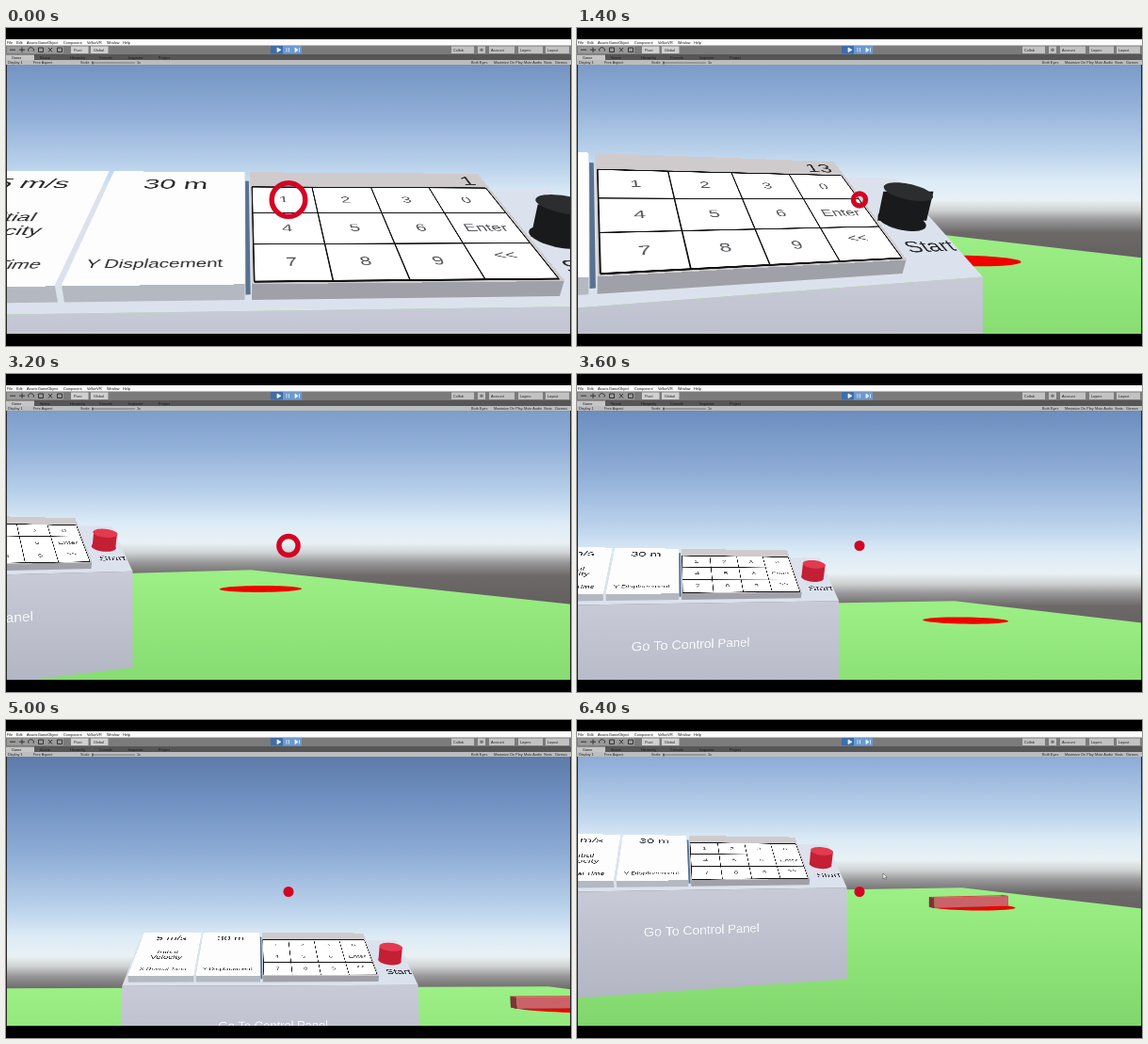
These frames come from a looping animation (600 by 338 pixels, 6.5 s). An HTML page with a canvas:

```html
<!DOCTYPE html>
<html lang="en">
<head>
<meta charset="utf-8">
<title>Control panel</title>
<style>
html, body { margin: 0; width: 100%; height: 100%; overflow: hidden; background: #000; }
#stage { position: relative; width: 600px; height: 338px; overflow: hidden; background: #000;
  font-family: "Liberation Sans", Arial, sans-serif; }
#view { position: absolute; left: 0; top: 39px; width: 600px; height: 286px; overflow: hidden; }
#view::after { content: ""; position: absolute; inset: 0; border: solid #2a2a2a; border-width: 0 1px; }
#world { position: absolute; left: 0; top: -39px; width: 600px; height: 338px; }
canvas, svg { position: absolute; left: 0; top: 0; }
.surface { position: absolute; left: 0; top: 0; width: 0; height: 0; transform-origin: 0 0; }
.surface div { position: absolute; }
.surface .label { white-space: pre; line-height: 1; transform: translate(-50%, -50%); }
svg text { font-size: 3.8px; }
</style>
</head>
<body>
<div id="stage">
  <div id="view"><div id="world">
    <canvas id="scene" width="600" height="338"></canvas>
    <div id="panel" class="surface"></div>
    <div id="desk" class="surface"></div>
    <div id="face" class="surface"></div>
    <svg width="600" height="338">
      <circle id="ring" cx="300" cy="182.500" fill="none" stroke="#d30424" stroke-width="5.500"/>
      <path id="mouse" d="M325 163v6l1.400-1.300 1 2.200 1-.5-1-2.100h1.800z" fill="#fff" stroke="#333" stroke-width=".5"/>
    </svg>
  </div></div>
  <svg id="chrome" width="600" height="39">
    <rect y="12" width="600" height="7" fill="#fbfbfb"/>
    <rect y="18.500" width="600" height="9.500" fill="#7b7b7b"/>
    <rect y="28" width="600" height="6" fill="#565656"/>
    <rect y="28.500" width="30" height="6" fill="#c6c6c6"/>
    <rect y="34" width="600" height="5" fill="#bdbdbd"/>
    <rect x="1" y="19.500" width="60" height="7.500" fill="#9a9a9a"/>
    <path d="M4 23.200h6M14 23.200h6M17 20.500v5.400M24 24.600a3 2.500 0 1 1 5 0M34.500 21h5v4.500h-5zM45 21l4 4.500m0-4.500l-4 4.500M54.500 21h5v4.500h-5z" fill="none" stroke="#333"/>
    <path d="M69 19.500h18.500v7.500H69zM90 19.500h18.500v7.500H90z" fill="#d0d0d0"/>
    <path d="M281 19h33v8.500h-33z" fill="#6c9ace"/>
    <path d="M281 19h13v8.500h-13z" fill="#3f6da8"/>
    <path d="M288 21l4 2.300-4 2.300zM298 21v4.500M300.500 21v4.500M307 21l3 2.300-3 2.300zM311.500 21v4.500" fill="#eaf3ff" stroke="#eaf3ff" stroke-width=".8"/>
    <path d="M473 19.500h24v7.500h-24zM501 19.500h8v7.500h-8zM513 19.500h27v7.500h-27zM544 19.500h26v7.500h-26zM573 19.500h25v7.500h-25z" fill="#c2c2c2"/>
    <circle cx="505" cy="23.200" r="1.800" fill="#777"/>
    <path d="M91 37h46" stroke="#555" stroke-width=".7"/>
    <path d="M92 35.500v3" stroke="#333"/>
  </svg>
</div>
<script>
const $ = id => document.getElementById(id);
const LOOP = 6500, FOCAL = 580, CX = 300, CY = 182.5;
const JUMP = 3000, FALL = 4100, LAND = 4900;
const NEAR = [0, 0, 0], FAR = [-.28, -.26, -12.35];

// Head direction: time, yaw and pitch in degrees
const gaze = [[0, 4.7, 1.85], [500, 16.9, 1.8], [900, 16.9, 1.8], [1400, 26.5, .35], [2000, 25.95, -.65],
  [2200, 25.95, -.65], [2600, 31.4, -.2], [3000, 31.4, -.2], [3200, 32.9, 0], [4100, 0, 7.65],
  [5000, 3.8, 7.05], [6400, 18.3, -3], [6500, 18.3, -3]];
const reticle = [[0, 17.8], [1200, 17.8], [1400, 6.5], [1500, 6.5], [1800, 17.5], [3000, 17.5],
  [3400, 2.8], [6500, 2.8]];

const rad = deg => deg * Math.PI / 180;
const mix = (a, b, k) => a + (b - a) * k;
const clamp = k => Math.max(0, Math.min(1, k));

function track(keys, t) {
  const i = keys.findIndex((key, n) => n && key[0] >= t);
  const a = keys[i - 1], b = keys[i];
  const k = (t - a[0]) / (b[0] - a[0]), ease = k * k * (3 - 2 * k);
  return a.slice(1).map((n, j) => mix(n, b[j + 1], ease));
}

// Camera
let eye = NEAR, yaw = 0, pitch = 0;

function turn([x, y, z]) {
  const ahead = x * Math.sin(yaw) + z * Math.cos(yaw);
  return [x * Math.cos(yaw) - z * Math.sin(yaw),
    y * Math.cos(pitch) - ahead * Math.sin(pitch),
    ahead * Math.cos(pitch) + y * Math.sin(pitch)];
}
const column = ([x, y, z]) => [CX * z + FOCAL * x, CY * z - FOCAL * y, 0, z];
const fromEye = p => turn(p.map((n, i) => n - eye[i]));
function spot(p) {
  const [x, y, , w] = column(fromEye(p));
  return [x / w, y / w];
}
// Lays an element on a plane; 100 CSS pixels make one unit.
function lay(id, origin, right, down) {
  const unit = v => column(turn(v.map(n => n / 100)));
  const m = [...unit(right), ...unit(down), 0, 0, 1, 0, ...column(fromEye(origin))];
  $(id).style.transform = `matrix3d(${m.map(n => n.toFixed(8))})`;
}

// The tilted panel: a goes right, b up the slope, n out of it. A key is 1 wide.
const ROW = .837, TILT = rad(31.5), S = Math.sin(TILT), C = Math.cos(TILT);
const DEEP = -.27, FLOOR = -4.57;
const on = (a, b, n = 0) => [.137 + a, -.809 + S * b + C * n, 6.9 + C * b - S * n];
const desk = { left: -4.82, right: 5.44, front: -.24, back: 2.95, tall: 3.4 };
const blocks = [[-4.65, -2.42], [-2.34, -.12], [-.03, 4.06]];
const TOP = -.65, BOTTOM = 3.06;

function plate(u0, v0, u1, v1, color) {
  const d = document.createElement('div');
  d.style.cssText = `left:${u0 * 100}px;top:${v0 * ROW * 100}px;width:${(u1 - u0) * 100}px;` +
    `height:${(v1 - v0) * ROW * 100}px;background:${color}`;
  $('panel').append(d);
}
function label(parent, text, x, y, size, color = '#2c2c2e') {
  const d = document.createElement('div');
  d.className = 'label';
  d.textContent = text;
  d.style.cssText = `left:${x * 100}px;top:${y * 100}px;font-size:${size}px;color:${color}`;
  $(parent).append(d);
  return d;
}
const write = (text, u, v, size, color) => label('panel', text, u, v * ROW, size, color);

plate(-.11, TOP + .4, -.05, 3.3, '#58728f');
blocks.forEach(([a, b], i) => plate(a, TOP, b, BOTTOM, i < 2 ? '#fdfdfe' : '#cfcbcd'));
plate(0, 0, 4, 3, '#fff');
for (let i = 0; i <= 4; i++) plate(i - .012, 0, i + .012, 3, '#111');
for (let i = 0; i <= 3; i++) plate(0, i - .02, 4, i + .02, '#111');
['1', '2', '3', '0', '4', '5', '6', 'Enter', '7', '8', '9', '<<'].forEach((key, i) =>
  write(key, i % 4 + .5, Math.floor(i / 4) + (key === '<<' ? .35 : .5), 28, '#55555a'));
write('5 m/s', -3.53, -.12, 47);
write('Initial', -3.53, 1.13, 33);
write('Velocity', -3.53, 1.57, 33);
write('X Reveal Time', -3.53, 2.52, 25);
write('30 m', -1.25, -.12, 47);
write('Y Displacement', -1.28, 2.52, 25);
const display = write('', 3.89, -.3, 44);
display.style.transform = 'translate(-100%, -50%)';
label('desk', 'Start', 4.94, -.62, 44);
label('face', 'Go To Control Panel', 5.16, 1.37, 42, '#f4f5f8');

// Editor bars
const bars = [
  [16.9, '#111', [1, 'File'], [11, 'Edit'], [22, 'Assets'], [34, 'GameObject'], [61, 'Component'], [86, 'VellunVR'], [107, 'Window'], [124, 'Help']],
  [24.8, '#222', [72, 'Pivot'], [93, 'Global'], [475, 'Collab'], [515, 'Account'], [546, 'Layers'], [575, 'Layout']],
  [32.6, '#161616', [6, 'Game'], [36, 'Scene'], [68, 'Hierarchy'], [99, 'Console'], [130, 'Inspector'], [162, 'Project']],
  [38.1, '#222', [2, 'Display 1'], [29, 'Free Aspect'], [79, 'Scale'], [139, '1x'], [494, 'Both Eyes'], [518, 'Maximize On Play'], [550, 'Mute Audio'], [571, 'Stats'], [583, 'Gizmos']]
];
for (const [y, fill, ...items] of bars) for (const [x, text] of items) {
  const el = document.createElementNS('http://www.w3.org/2000/svg', 'text');
  Object.entries({ x, y, fill }).forEach(pair => el.setAttribute(...pair));
  el.textContent = text;
  $('chrome').append(el);
}

const ctx = $('scene').getContext('2d');

function poly(fill, pts) {
  ctx.fillStyle = fill;
  ctx.beginPath();
  pts.forEach(p => ctx.lineTo(...p));
  ctx.fill();
}
const solid = (fill, ...pts) => poly(fill, pts.map(spot));
function disc(fill, [x, y, z], r, tilt = 0) {
  const pts = Array.from({ length: 48 }, (_, i) => {
    const a = i * Math.PI / 24, up = r * Math.sin(a);
    return [x + r * Math.cos(a), y + up * Math.sin(tilt), z + up * Math.cos(tilt)];
  });
  solid(fill, ...pts);
}
function fade(y0, y1, ...stops) {
  const g = ctx.createLinearGradient(0, y0, 0, y1);
  stops.forEach(([k, c]) => g.addColorStop(k, c));
  return g;
}

function drawLand() {
  const hz = CY + FOCAL * Math.tan(pitch) + 6;
  ctx.fillStyle = fade(hz - 240, hz + 60, [0, '#56739f'], [.2, '#6d8ebf'], [.42, '#90aed7'],
    [.6, '#bad2eb'], [.7, '#dcebf6'], [.77, '#e9f1f4'], [.805, '#cfd2d3'], [.84, '#98989a'], [.885, '#6d6969'], [1, '#625e5e']);
  ctx.fillRect(0, 0, 600, 338);

  const edge = [[-60, FLOOR, 72.6], [46.7, FLOOR, 72.6], [37.7, FLOOR, -.35]].map(spot);
  const y = edge[1][1];
  poly(fade(y, y + 150, [0, '#9cf085'], [1, '#80d56c']), [...edge, [9000, 400], [-9000, 400]]);
  disc('#f00000', [27.1, FLOOR, 35.1], 4.1);
}

function drawSlab(t) {
  const k = clamp((t - FALL) / (LAND - FALL));
  const x = mix(-12.7, 27.1, k), y = mix(9.9, FLOOR, k * k), z = 35.1;
  const [l, r, top, deep] = [x - 4.1, x + 4.1, y + 1, z + 1.2];

  const high = y - FLOOR, sx = -.38 * high, sz = z + .63 * high;
  solid('#4f8546', [l + sx, FLOOR, sz], [r + sx, FLOOR, sz], [r + sx, FLOOR, sz + 1.2], [l + sx, FLOOR, sz + 1.2]);

  solid('#7b3036', [l, y, z], [r, y, z], [r, y, deep], [l, y, deep]);
  solid('#e0353d', [l, top, z], [r, top, z], [r, top, deep], [l, top, deep]);
  for (const end of [l, r]) solid('#7e3338', [end, y, z], [end, top, z], [end, top, deep], [end, y, deep]);
  solid('#cb6268', [l, y, z], [r, y, z], [r, top, z], [l, top, z]);
}

function drawDesk() {
  const { left, right, front, back, tall } = desk;
  const a = on(left, front, DEEP), b = on(right, front, DEEP);
  const below = ([x, y, z]) => [x, y - tall, z];
  solid('#dce2ed', a, b, on(right, back, DEEP), on(left, back, DEEP));
  const y = spot(b)[1];
  poly(fade(y, y + 120, [0, '#c8cbd7'], [1, '#b2b5c2']), [a, b, below(b), below(a)].map(spot));
  const foot = (3 - BOTTOM) * ROW;
  blocks.forEach(([u0, u1], i) => solid(i < 2 ? '#b4b8c1' : '#a0a1a8',
    on(u0, foot + .02), on(u1, foot + .02), on(u1, foot, -.25), on(u0, foot, -.25)));
}

function drawKnob(red) {
  const tilt = rad(23), r = .43, high = .55;
  const base = on(4.8, 1.4, DEEP);
  const [x, y, z] = base;
  const cap = [x, y + high * Math.cos(tilt), z - high * Math.sin(tilt)];
  const side = ([px, py, pz], dx) => [px + dx * Math.cos(yaw), py, pz - dx * Math.sin(yaw)];
  const body = red ? '#c31f35' : '#191a1c';
  disc(body, base, r, tilt);
  solid(body, side(base, -r), side(base, r), side(cap, r), side(cap, -r));
  disc(red ? '#e33a50' : '#2b2d2f', cap, r, tilt);
}

function draw(t) {
  [yaw, pitch] = track(gaze, t).map(rad);
  eye = t < JUMP ? NEAR : FAR;
  drawLand();
  if (t >= JUMP) drawSlab(t);
  drawDesk();
  drawKnob(t >= JUMP - 100);

  const right = [1, 0, 0], slope = [0, -S, -C];
  lay('panel', on(0, 3 * ROW), right, slope);
  lay('desk', on(0, 0, DEEP), right, slope);
  lay('face', on(desk.left, desk.front, DEEP), right, [0, -1, 0]);
  display.textContent = t < 800 ? '1' : t < 2200 ? '13' : '';
  $('ring').setAttribute('r', track(reticle, t)[0]);
  $('mouse').style.display = t >= 6000 ? '' : 'none';
}

const start = performance.now();
function tick() {
  draw((performance.now() - start) % LOOP);
  requestAnimationFrame(tick);
}
tick();
</script>
</body>
</html>
```
